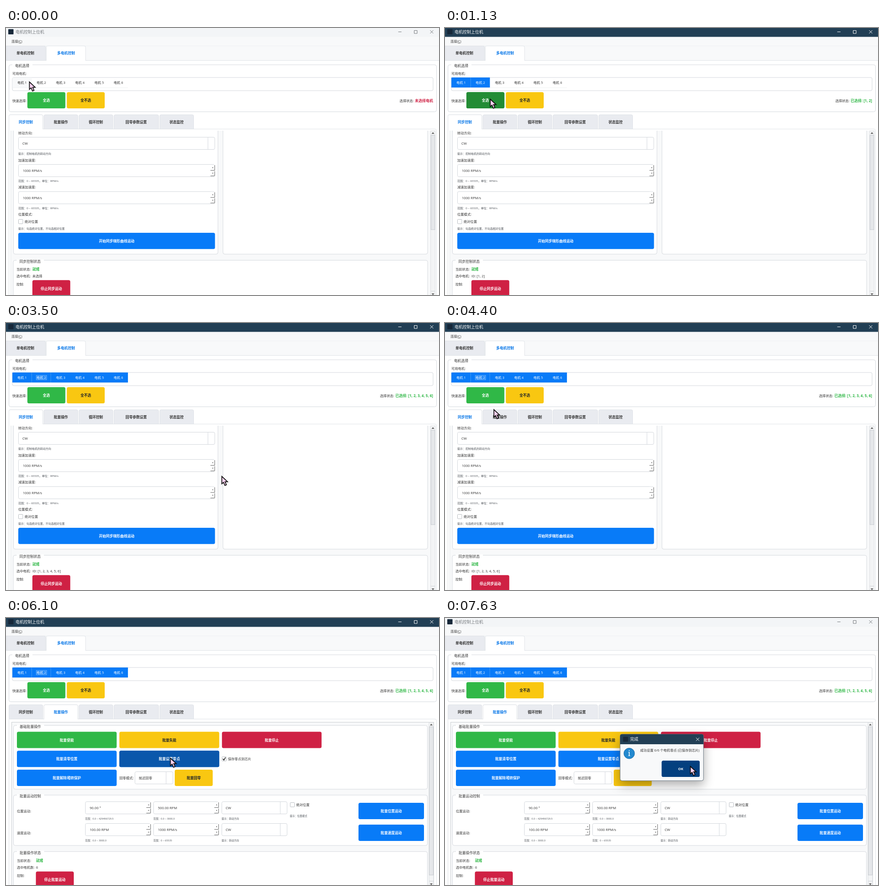
An HTML page for the animation above (8000 ms loop, 952 px wide and 588 px high).

```html
<!DOCTYPE html>
<html>
<head>
<meta charset="utf-8">
<title>电机控制上位机</title>
<style>
html, body { margin: 0; width: 100%; height: 100%; overflow: hidden; background: #f8f9fa; }
svg { display: block; width: 952px; height: 588px; }
text { font-family: "Open Sans", "Noto Sans CJK SC", "Noto Sans CJK", sans-serif; white-space: pre; }
.timed { animation: 8s step-end infinite; }
#cursor { animation: move 8s ease-in-out infinite; }
#dialog { animation: pop 8s linear infinite; transform-origin: 476px 307px; }
#dialog > rect:first-child { filter: drop-shadow(0 9px 11px rgba(0, 0, 0, .32)); }
@keyframes pop {
  0%, 87.4% { opacity: 0; transform: scale(.94); }
  87.5% { opacity: .4; transform: scale(.96); }
  89%, 100% { opacity: 1; transform: none; }
}
</style>
</head>
<body>
<svg id="stage" viewBox="0 0 952 588"></svg>
<script>
const LOOP = 8000;
const GREEN = '#30b847', BLUE = '#087bf8', YELLOW = '#f9c711', RED = '#cf2144',
      NAVY = '#223f55', INK = '#333', LINE = '#d5d9de', PALE = '#f8f9fa';
let css = '', count = 0;

const pct = t => +(t / LOOP * 100).toFixed(4) + '%';

// Shows its content only inside the given [from, to] spans (ms).
function timed(spans, content) {
  const name = 'v' + count++;
  let keys = spans[0][0] > 0 ? '0%{visibility:hidden}' : '';
  for (const [from, to] of spans) {
    keys += `${pct(from)}{visibility:visible}`;
    if (to < LOOP) keys += `${pct(to)}{visibility:hidden}`;
  }
  css += `@keyframes ${name}{${keys}}`;
  return `<g class="timed" style="animation-name:${name}">${content}</g>`;
}

function box(x1, y1, x2, y2, fill, stroke = 'none', r = 0) {
  return `<rect x="${x1}" y="${y1}" width="${x2 - x1}" height="${y2 - y1}" rx="${r}" fill="${fill}" stroke="${stroke}"/>`;
}
function path(d, stroke, fill = 'none', width = 1) {
  return `<path d="${d}" stroke="${stroke}" fill="${fill}" stroke-width="${width}"/>`;
}
// y is the vertical middle of the text.
function text(x, y, str, { size = 7.3, fill = INK, weight = 400, anchor = 'start' } = {}) {
  return `<text x="${x}" y="${(y + size * .37).toFixed(2)}" font-size="${size}" fill="${fill}" font-weight="${weight}" text-anchor="${anchor}">${str}</text>`;
}
const latin = (x, y, str) => text(x, y, str, { size: 7.65 });
const hint = (x, y, str, size = 6) => text(x, y, str, { size, fill: '#4c5157' });
const bold = (x, y, str, fill, anchor = 'middle') => text(x, y, str, { size: 7.8, weight: 700, fill, anchor });

function button(x1, y1, x2, y2, fill, label) {
  return box(x1, y1, x2, y2, fill, 'none', 3.5) +
    bold((x1 + x2) / 2, (y1 + y2) / 2 + .3, label, fill === YELLOW ? '#212529' : '#fff');
}
function group(x1, y1, x2, y2, title, chars) {
  const tx = x1 + 13.5;
  return box(x1, y1, x2, y2, '#fff', LINE, 4) +
    box(tx - 6, y1 - 2, tx + chars * 7.8 + 7, y1 + 2, '#fff') +
    text(tx, y1 + 2.5, title, { size: 7.8, weight: 500 });
}
function field(x1, y1, x2, y2) { return box(x1 + .5, y1 + .5, x2 - .5, y2 - .5, '#fff', '#d3d7dc', 3); }
function combo(x1, y1, x2, label) {
  const y2 = y1 + 28;
  return field(x1, y1, x2, y2) + path(`M${x2 - 15.5} ${y1 + 1}V${y2 - 1}`, '#d3d7dc') + latin(x1 + 9, y1 + 14, label);
}
function spin(x1, y1, x2, label) {
  const r = x2 - .7, l = x2 - 10, half = y1 + 13.5, end = y1 + 25.7;
  return field(x1, y1, x2, y1 + 28) + box(l, y1 + 1, x2, y1 + 27, '#fff') +
    path(`M${r} ${y1 + 2}V${half}H${l}M${r} ${half + 2}V${end}H${l}`, '#666') +
    box(l + 4, y1 + 7, l + 6, y1 + 8.2, INK) + box(l + 4, y1 + 19, l + 6, y1 + 20.2, INK) +
    latin(x1 + 10, y1 + 14, label);
}
const check = (x, y) => box(x + .5, y + .5, x + 10, y + 10, '#fff', '#b9bdc2', 1);

function scrollbar(x, top, thumbEnd) {
  const c = x + 5;
  return box(x, top, x + 10, 588, '#f3f4f5', '#dcdfe2') +
    box(x + .5, top + 9.5, x + 9.5, thumbEnd, '#e5e7ea', '#c6cacf') +
    path(`M${x} 579.5H${x + 10}`, '#cdd1d5') +
    path(`M${c - 3} ${top + 6.5}L${c} ${top + 3}L${c + 3} ${top + 6.5}z`, 'none', '#555') +
    path(`M${c - 3} 584.5L${c} 588L${c + 3} 584.5z`, 'none', '#555');
}

function titleBar(bg, ink, weight) {
  return box(0, 0, 952, 19.5, bg) + box(5, 2.5, 16.5, 14, '#17283a', 'none', 1) +
    text(21, 8.3, '电机控制上位机', { size: 9, fill: ink }) +
    path('M862.5 8.5H869.5M897.5 5.5H904V12H897.5zM932.5 5L939.5 12M939.5 5L932.5 12', ink);
}

function mainTabs() {
  return text(12, 29.5, '连接(<tspan text-decoration="underline">C</tspan>)') +
    path('M0 39.5H952', '#eff1f3') + box(0, 71, 952, 588, '#fff') + path('M0 71.5H952', '#dfe3e7') +
    path('M0 71V39.5H84q3 0 3 3V71', '#dfe3e7', '#e9ebf0') +
    path('M88.5 72V42.5q0-3 3-3H172q3 0 3 3V72', '#dfe3e7', '#fff') +
    bold(42.5, 55.3, '单电机控制', INK) + bold(132, 55.3, '多电机控制', '#0a78e8');
}

const itemX = i => 14 + i * 42.35;
const item = (i, fill) => text(itemX(i) + 11, 120.3, '电机 ' + (i + 1), { fill });
const selected = (from, to) => {
  let s = box(itemX(from), 109, itemX(to + 1), 131, BLUE);
  for (let i = from; i <= to; i++) s += item(i, '#fff');
  return s;
};
function status(value, fill) {
  return text(939, 160, `选择状态:<tspan dx="2.5" font-size="8" font-weight="700" fill="${fill}">${value}</tspan>`, { anchor: 'end' });
}

function picker() {
  let s = group(6.5, 81, 946.5, 184.5, '电机选择', 4) + text(14, 100.5, '可用电机:') +
    field(13.5, 108.5, 939.5, 138.5) + path('M15 131.5H268', '#f0f2f4');
  s += timed([[0, 30]], box(14.5, 109.5, 57, 131, PALE));
  for (let i = 0; i < 6; i++) s += item(i, INK);
  s += timed([[30, LOOP]], selected(0, 0)) + timed([[670, LOOP]], selected(1, 1)) +
    timed([[1870, LOOP]], selected(2, 5)) +
    timed([[2200, 7000]], box(66.5, 115.5, 89.5, 125, 'rgba(255,255,255,.1)', 'rgba(255,255,255,.35)'));
  s += text(14, 159.8, '快速选择:') + button(47, 141.3, 130.5, 177, GREEN, '全选') +
    timed([[1000, 1300], [4100, 4370]], button(47, 141.3, 130.5, 177, '#238c35', '全选')) +
    timed([[1300, 1700]], button(47, 141.3, 130.5, 177, '#1f8032', '全选')) +
    button(133.7, 141.3, 217, 177, YELLOW, '全不选');
  return s + timed([[0, 30]], status('未选择电机', RED)) +
    timed([[30, 670]], status('已选择: [1]', GREEN)) +
    timed([[670, 1870]], status('已选择: [1, 2]', GREEN)) +
    timed([[1870, LOOP]], status('已选择: [1, 2, 3, 4, 5, 6]', GREEN));
}

const TABS = [[6, 81, '同步控制'], [83, 158, '批量操作'], [160, 235, '循环控制'], [237, 335.5, '回零参数设置'], [337.5, 412.5, '状态监控']];
function subTab(i, active, fill = active ? '#fff' : '#e9ebf0') {
  const [a, b, label] = TABS[i], end = active ? 223 : 222;
  return path(`M${a + .5} ${end}V194q0-3 3-3H${b - 3}q3 0 3 3V${end}`, '#dfe2e7', fill) +
    bold((a + b) / 2, 207, label, active ? '#0a78e8' : INK);
}
function subTabs() {
  return path('M6.5 588V222.5H943q3.5 0 3.5 3.5V588', '#dfe3e7') +
    TABS.map((_, i) => subTab(i, false)).join('') +
    timed([[0, 4630]], subTab(0, true)) + timed([[4630, LOOP]], subTab(1, true)) +
    timed([[4630, 5760]], subTab(1, true, '#f6f8f9'));
}

function syncPage() {
  const panel = (a, b) => path(`M${a + .5} 226V494q0 4 4 4H${b - 4}q4 0 4-4V226`, LINE, '#fff');
  const range = '范围：0 ~ 65535，单位：RPM/s';
  const ids = (from, to, str) => timed([[from, to]], text(58, 546, str, { size: str[0] === 'I' ? 7.65 : 7.3 }));
  return box(10, 226, 944, 588, PALE) + path('M10.5 588V226', '#e4e7ea') + panel(16, 466) + panel(476.5, 927) +
    text(27, 231.3, '转动方向:') + combo(27, 240, 459.5, 'CW') + hint(27, 277, '提示：控制电机的转动方向') +
    text(27, 291, '加速加速度:') + spin(27, 300, 459.5, '1000 RPM/s') + hint(27, 336.7, range, 6.1) +
    text(27, 350.5, '减速加速度:') + spin(27, 359.7, 459.5, '1000 RPM/s') + hint(27, 396.3, range, 6.1) +
    text(27, 410.3, '位置模式:') + check(27, 421) + text(41, 426.3, '绝对位置') +
    hint(27, 442, '提示：勾选绝对位置，不勾选相对位置') +
    button(27, 451, 459.5, 486.7, BLUE, '开始同步梯形曲线运动') +
    group(16, 511.5, 927, 620, '同步控制状态', 6) +
    text(23, 531.3, '当前状态:') + bold(58, 531.5, '就绪', GREEN, 'start') +
    text(23, 546, '选中电机:') + text(23, 564, '控制:') +
    ids(0, 30, '未选择') + ids(30, 670, 'ID: [1]') + ids(670, 1870, 'ID: [1, 2]') + ids(1870, 4630, 'ID: [1, 2, 3, 4, 5, 6]') +
    button(58, 555.3, 141.3, 591.5, RED, '停止同步运动') + scrollbar(933.7, 226.5, 444);
}

function motionRow(y, label, first, second, range1, range2, action) {
  return text(24, y + 21.5, label) + spin(174, y, 318.5, first) + spin(324, y, 468, second) + combo(474, y, 618.5, 'CW') +
    hint(174, y + 38, range1, 5.45) + hint(324, y + 38, range2, 5.45) + hint(474, y + 38, '提示：转动方向', 5.45) +
    button(775, y + 3, 919, y + 39, BLUE, action);
}

function batchPage() {
  const cols = [[24, 243.3], [249.3, 468.8], [474.8, 693.8]];
  const cell = (c, y, fill, label) => button(cols[c][0], y, cols[c][1], y + 36, fill, label);
  return box(12.5, 229.5, 940.5, 600, PALE, '#c9cdd1') +
    group(16.5, 236.5, 926.5, 377, '基础批量操作', 6) +
    cell(0, 250.4, GREEN, '批量使能') + cell(1, 250.4, YELLOW, '批量失能') + cell(2, 250.4, RED, '批量停止') +
    cell(0, 292.2, BLUE, '批量清零位置') + cell(1, 292.2, BLUE, '批量设置零点') +
    timed([[6020, 7000]], cell(1, 292.2, '#0a57ab', '批量设置零点')) +
    check(474.5, 305) + path('M476.8 310L479 313L482.7 306.8', '#222', 'none', 1.6) + text(488, 310.2, '保存零点到芯片') +
    cell(0, 334, BLUE, '批量解除堵转保护') + text(249.3, 352.3, '回零模式:') +
    combo(283, 338, 367.5, '') + text(292, 352.3, '就近回零') + button(371, 334, 454.5, 370, YELLOW, '批量回零') +
    group(16.5, 390, 926.5, 501, '批量运动控制', 6) +
    motionRow(404, '位置运动:', '90.00 °', '500.00 RPM', '范围：0.0 ~ 429496729.5', '范围：0.0 ~ 3000.0', '批量位置运动') +
    check(624.5, 406) + text(638, 411.5, '绝对位置') + hint(624, 436, '提示：位置模式', 5.45) +
    motionRow(452, '速度运动:', '100.00 RPM', '1000 RPM/s', '范围：0.0 ~ 3000.0', '范围：0 ~ 65535', '批量速度运动') +
    group(16.5, 514.3, 926.5, 620, '批量操作状态', 6) +
    text(24, 534.3, '当前状态:') + bold(66, 534.5, '就绪', GREEN, 'start') +
    text(24, 549, '选中电机数:') + latin(66, 549, '6') + text(24, 567, '控制:') +
    button(65.7, 558.3, 149, 594, RED, '停止批量运动') + scrollbar(930, 230, 566);
}

function dialog() {
  const ok = fill => button(476.5, 314.3, 560, 350, fill, 'OK');
  return `<g id="dialog">` + box(385, 256, 568.3, 358.3, PALE, '#6b7782', 4) +
    path('M385 278V260q0-4 4-4H564.3q4 0 4 4V278z', 'none', NAVY) +
    box(391.5, 261.5, 402.5, 272.5, '#17283a', 'none', 1) +
    text(407, 267, '完成', { size: 9, fill: '#fff' }) + path('M552 263.7L559 270.7M559 263.7L552 270.7', '#fff') +
    `<circle cx="405" cy="298.2" r="11.8" fill="#2389cf" stroke="#17639c" stroke-width=".8"/>` +
    `<text x="405" y="303.8" font-size="17" fill="#fff" text-anchor="middle" style="font-family:'Noto Serif',serif">i</text>` +
    text(429, 291.5, '成功设置 6/6 个电机零点 (已保存到芯片)') +
    ok('#0a57ab') + timed([[7600, LOOP]], ok('#04407f')) + '</g>';
}

// Pointer path: time, x, y
const PATH = [
  [0, 51, 118], [130, 51, 118], [430, 78, 119], [750, 78, 119], [1130, 99, 156], [1300, 101, 158],
  [1670, 101, 158], [1730, 380, 157], [1870, 380, 157], [2000, 385, 135], [3340, 385, 135],
  [3440, 512, 341], [3500, 474, 337], [3870, 474, 337], [4170, 100, 163], [4300, 100, 163],
  [4400, 107, 190], [4600, 107, 190], [4700, 136, 203], [5730, 136, 203], [6100, 361, 308],
  [7060, 361, 308], [7400, 539, 326], [LOOP, 539, 326]
];
css += '@keyframes move{' + PATH.map(([t, x, y]) => `${pct(t)}{transform:translate(${x}px,${y}px)}`).join('') + '}';
const cursor = '<g id="cursor">' +
  '<path d="M.5 .8V17.2L4.3 13.8L7.3 20.8L10.6 19.4L7.7 12.6H13.2z" fill="#fbd3f2" stroke="#0c0c0c" stroke-width="1.7"/></g>';

const art = box(0, 0, 952, 588, PALE) + titleBar('#f3f5f7', '#767a7e') +
  timed([[30, 7000]], titleBar(NAVY, '#fff')) + mainTabs() + picker() + subTabs() +
  timed([[0, 4630]], syncPage()) + timed([[4630, LOOP]], batchPage()) + dialog() + cursor;

// Nested timed groups must not outlive their page, so inner spans stay within the outer ones.
document.head.appendChild(document.createElement('style')).textContent = css;
document.getElementById('stage').innerHTML = art;
</script>
</body>
</html>
```
